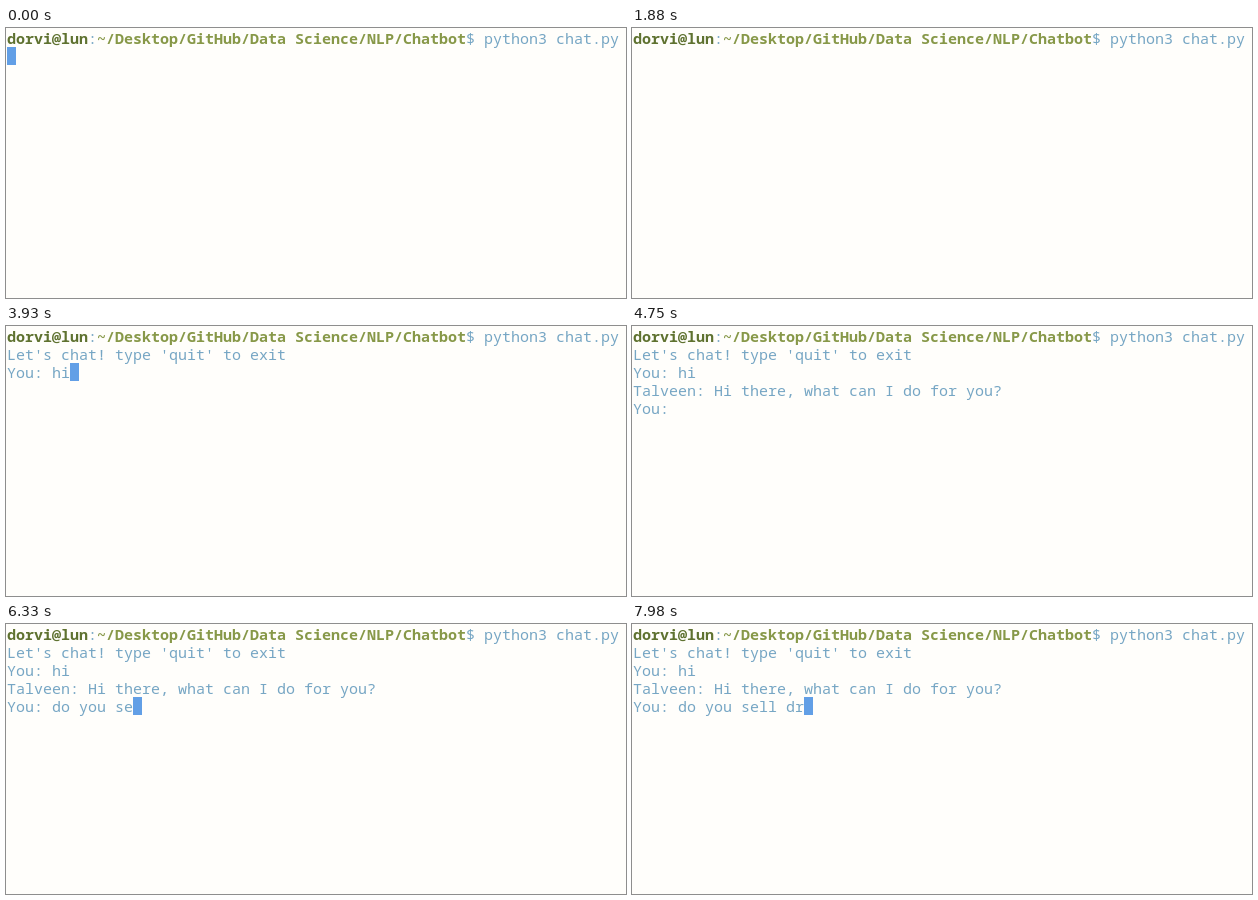
Animation, 620 px wide and 270 px high, one loop 8 s. Source, as an HTML page:

```html
<!DOCTYPE html>
<html lang="en">
<head>
<meta charset="utf-8">
<title>Terminal chat</title>
<style>
  html, body { margin: 0; width: 100%; height: 100%; overflow: hidden; background: #fffefb; }
  pre {
    position: absolute; left: 1px; top: 1px; margin: 0;
    font: 15px/18px "Noto Sans Mono", "DejaVu Sans Mono", monospace;
    font-variant-ligatures: none;
    color: #76a6c4;
  }
  .user { color: #5f7230; }
  .path { color: #879848; }
  #cursor { position: absolute; width: 9px; height: 18px; background: #629fe6; }
</style>
</head>
<body>
<pre><b class="user">dorvi@lun</b>:<b class="path">~/Desktop/GitHub/Data Science/NLP/Chatbot</b>$ python3 chat.py
<span id="out"></span><i id="cursor"></i></pre>
<script>
const LOOP = 8000, BLINK = 600, CHAR = 9, LINE = 18;
const out = document.getElementById('out');
const cursor = document.getElementById('cursor');

// [time in ms, text added to the screen]; each one restarts the cursor blink
const events = [
  [-300, ''],
  [2100, "Let's chat! type 'quit' to exit\nYou: "],
  [3560, 'h'], [3700, 'i'],
  [4100, '\nTalveen: Hi there, what can I do for you?\nYou: '],
  [5350, 'd'], [5450, 'o'], [5570, ' '],
  [5700, 'y'], [5820, 'o'], [5930, 'u'], [6050, ' '],
  [6170, 's'], [6290, 'e'], [6410, 'l'], [6540, 'l'], [6730, ' '],
  [7780, 'd'], [7900, 'r']
];

function draw(now) {
  const t = now % LOOP;
  const past = events.filter(([time]) => time <= t);
  const text = past.map(([, added]) => added).join('');
  const lines = text.split('\n');
  const idle = t - past[past.length - 1][0];

  if (out.textContent !== text) out.textContent = text;
  cursor.style.left = lines[lines.length - 1].length * CHAR + 'px';
  cursor.style.top = lines.length * LINE + 'px';
  cursor.style.visibility = Math.floor(idle / BLINK) % 2 ? 'hidden' : 'visible';
}

const start = performance.now();
function tick() {
  draw(performance.now() - start);
  requestAnimationFrame(tick);
}
tick();
</script>
</body>
</html>
```
